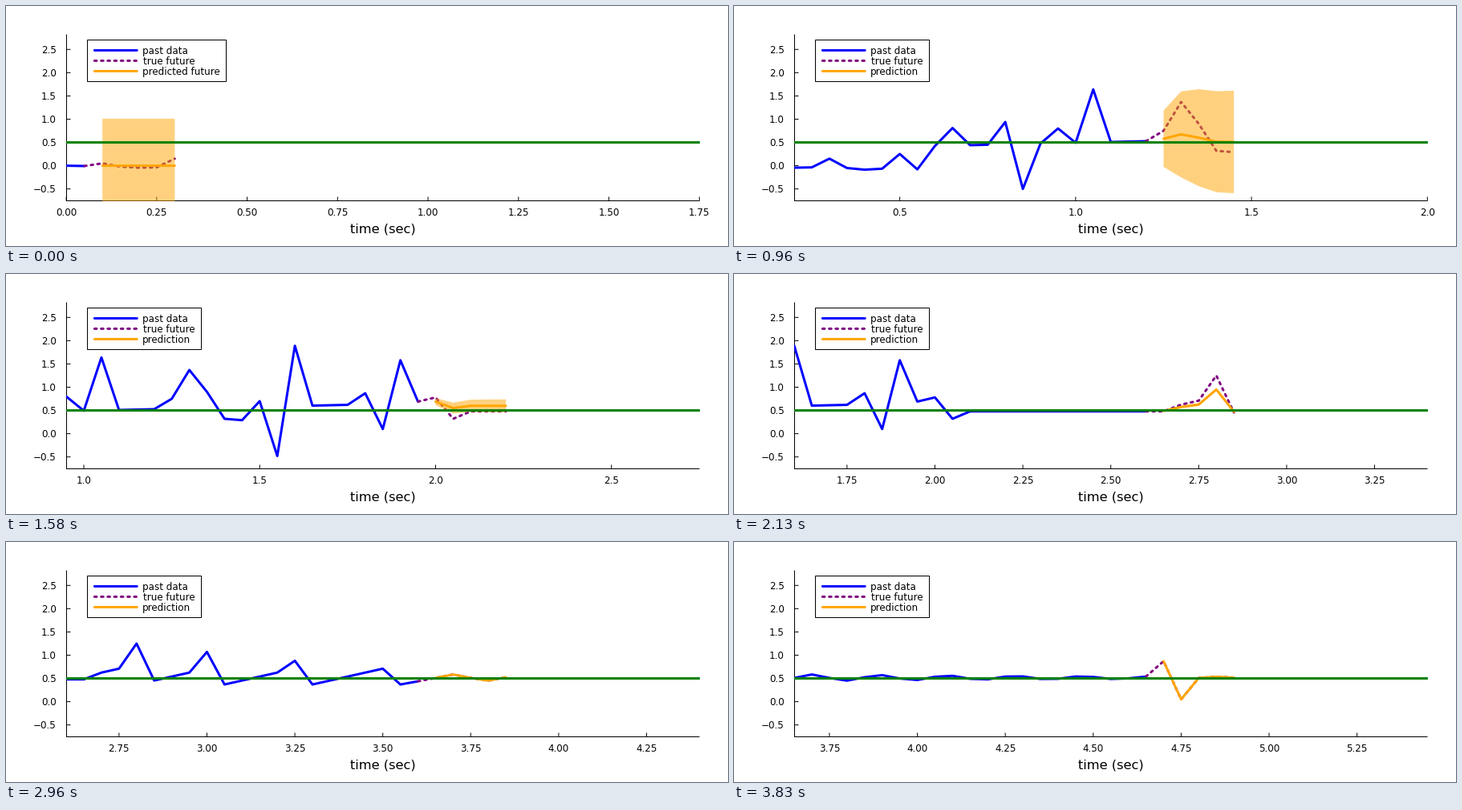
Animation of 900x300 px, one loop 3870 ms. Source, as a matplotlib script:

```python
import numpy as np
import matplotlib.pyplot as plt
from matplotlib.animation import FuncAnimation
from matplotlib.patches import Polygon, Rectangle

W, H, DPI = 900, 300, 100
TICK, FRAMES, RATE = 15, 258, 24    # 15 ms redraws, data moves 24 times a second
DT, WINDOW, AHEAD, SAMPLES = 0.05, 20, 5, 99
LEFT, RIGHT, TOP, BOTTOM = 75.1, 864.3, 35.5, 243.5
ZERO, UNIT = 199.6, 58.13
PX = 72 / DPI
SMALL, LARGE = 11.85 * PX, 16.3 * PX

SPIKES = {13: .81, 16: .94, 17: -.5, 19: .8, 21: 1.64, 25: .75, 26: 1.37,
          27: .9, 28: .32, 29: .29, 30: .7, 31: -.48, 32: 1.89, 36: .87,
          37: .1, 38: 1.58, 39: .69, 40: .78, 41: .32, 56: 1.25, 60: 1.07,
          65: .88, 94: .87, 95: .05}


def make_signal():
    i = np.arange(SAMPLES)
    wobble = .018 * i * (np.cos(np.pi * (i - 2) / 2) + .4 * np.cos(np.pi * i))
    climb = .45 + .0085 * (i - 15)
    saw = .37 + .085 * ((i - 61) % 5)
    ring = .515 + .07 * np.exp((74 - i) / 20) * np.cos(2 * np.pi * (i - 74) / 3.85)
    y = np.select([i < 12, i < 41, i < 54, i < 72], [wobble, climb, .48, saw], ring)
    for k, v in SPIKES.items():
        y[k] = v
    return y


SIGNAL = make_signal()

# how far the forecast follows the signal, and the level it falls back to
STAGES = [4, 14, 23, 38, 51, 71]
GAIN = [0, .9, .15, .3, .6, 1]
LEVEL = [0, .5, .55, .65, .5, .5]


def predict(n):
    gain, level = np.interp(n, STAGES, GAIN), np.interp(n, STAGES, LEVEL)
    mean = level + gain * (SIGNAL[n + 2:n + 2 + AHEAD] - level)
    flare = 1 + 1.5 * np.exp(-((n - 10) / 2.5) ** 2)
    size = min(1, np.exp((23 - n) / 7)) * flare + .01
    taper = 1.1 - .5 * np.exp(-np.arange(AHEAD))
    learned = np.clip((n - 4) / 10, 0, 1)
    return mean, size * (1 + learned * (taper - 1))


plt.rcParams["font.family"] = "DejaVu Sans"
plt.rcParams["path.snap"] = False
fig = plt.figure(figsize=(W / DPI, H / DPI), dpi=DPI, facecolor="white")
ax = fig.add_axes([0, 0, 1, 1])
ax.set_xlim(0, W)
ax.set_ylim(H, 0)
ax.axis("off")
area = Rectangle((75, TOP), 789.5, BOTTOM - TOP, transform=ax.transData)


def line(x, y, color, width=3, z=2, clip=True, **style):
    item, = ax.plot(x, y, color=color, lw=width * PX, zorder=z,
                    solid_capstyle="round", dash_capstyle="round",
                    solid_joinstyle="round", dash_joinstyle="round", **style)
    if clip:
        item.set_clip_path(area)
    return item


def thin(x, y):
    item = line(x, y, "black", 1, 1, False)
    item.set_solid_capstyle("butt")
    return item


def label(x, y, text, ha="center", size=SMALL, z=1):
    return ax.text(x, y, text, ha=ha, va="baseline", fontsize=size,
                   color="black", zorder=z)


def to_y(value):
    return ZERO - UNIT * np.asarray(value)


# fixed axes
thin([75.5, 75.5], [TOP, BOTTOM])
thin([75, 864.5], [BOTTOM, BOTTOM])
for v in np.arange(-.5, 2.6, .5):
    y = float(to_y(v))
    thin([75.5, 80.5], [y, y])
    label(62.8, y + 4.4, f"{v:.1f}".replace("-", "\u2212"), "right")
label(470, 284, "time (sec)", size=LARGE)

marks = [(thin([0, 0], [BOTTOM, BOTTOM - 5]), label(0, 261.6, ""))
         for _ in range(8)]

# data
DASH = (0, (.9, 1.85))
past = line([], [], "blue", z=2)
true = line([], [], "purple", z=3, linestyle=DASH)
band = ax.add_patch(Polygon([(0, 0), (1, 1), (1, 0)], fc="orange", ec="none",
                            alpha=.5, zorder=4))
band.set_clip_path(area)
guess = line([], [], "orange", z=5)
goal = line([LEFT, RIGHT], [float(to_y(.5))] * 2, "green", z=6)

# legend
box = ax.add_patch(Rectangle((101.5, 42.5), 173, 52, fc="white", ec="black",
                             lw=PX, zorder=8))
names = []
for i, (color, dash, x, text) in enumerate([
        ("blue", "-", 169.9, "past data"),
        ("purple", DASH, 171.2, "true future"),
        ("orange", "-", 169.9, "predicted future")]):
    y = 55.4 + 13 * i
    line([110.3, 163.3], [y, y], color, z=9, clip=False, linestyle=dash)
    names.append(label(x, y + 4.4, text, "left", z=9))


def draw(frame):
    n = int((frame + 1) * TICK * RATE / 1000)
    now = n + 1
    scrolling = now >= WINDOW
    start = now - WINDOW if scrolling else 0
    span = 36 if scrolling else 35

    def to_x(i):
        return LEFT + (np.asarray(i) - start) * (RIGHT - LEFT) / span

    # tick spacing: 0.25 when too few half units fit in the window
    step = 5 if not scrolling or start % 10 in (1, 2, 3) else 10
    first = -(-start // step) * step
    for k, (tick, text) in enumerate(marks):
        i = first + k * step
        shown = i <= start + span
        tick.set_visible(shown)
        text.set_visible(shown)
        x = float(to_x(i))
        tick.set_xdata([x, x])
        text.set_x(x)
        text.set_text(f"{i * DT:.{2 if step == 5 else 1}f}")

    seen = np.arange(start, now + 1)
    past.set_data(to_x(seen), to_y(SIGNAL[seen]))
    coming = np.arange(now, now + AHEAD + 1)
    true.set_data(to_x(coming), to_y(SIGNAL[coming]))

    mean, half = predict(n)
    xs = to_x(coming[1:])
    guess.set_data(xs, to_y(mean))
    band.set_xy(np.column_stack([
        np.r_[xs, xs[::-1]],
        np.r_[to_y(mean + half), to_y(mean - half)[::-1]]]))

    names[2].set_text("prediction" if scrolling else "predicted future")
    box.set_width(142 if scrolling else 173)
    return []


anim = FuncAnimation(fig, draw, frames=FRAMES, interval=TICK,
                     init_func=lambda: draw(0), repeat=True, repeat_delay=0,
                     blit=False)
plt.show()
```
